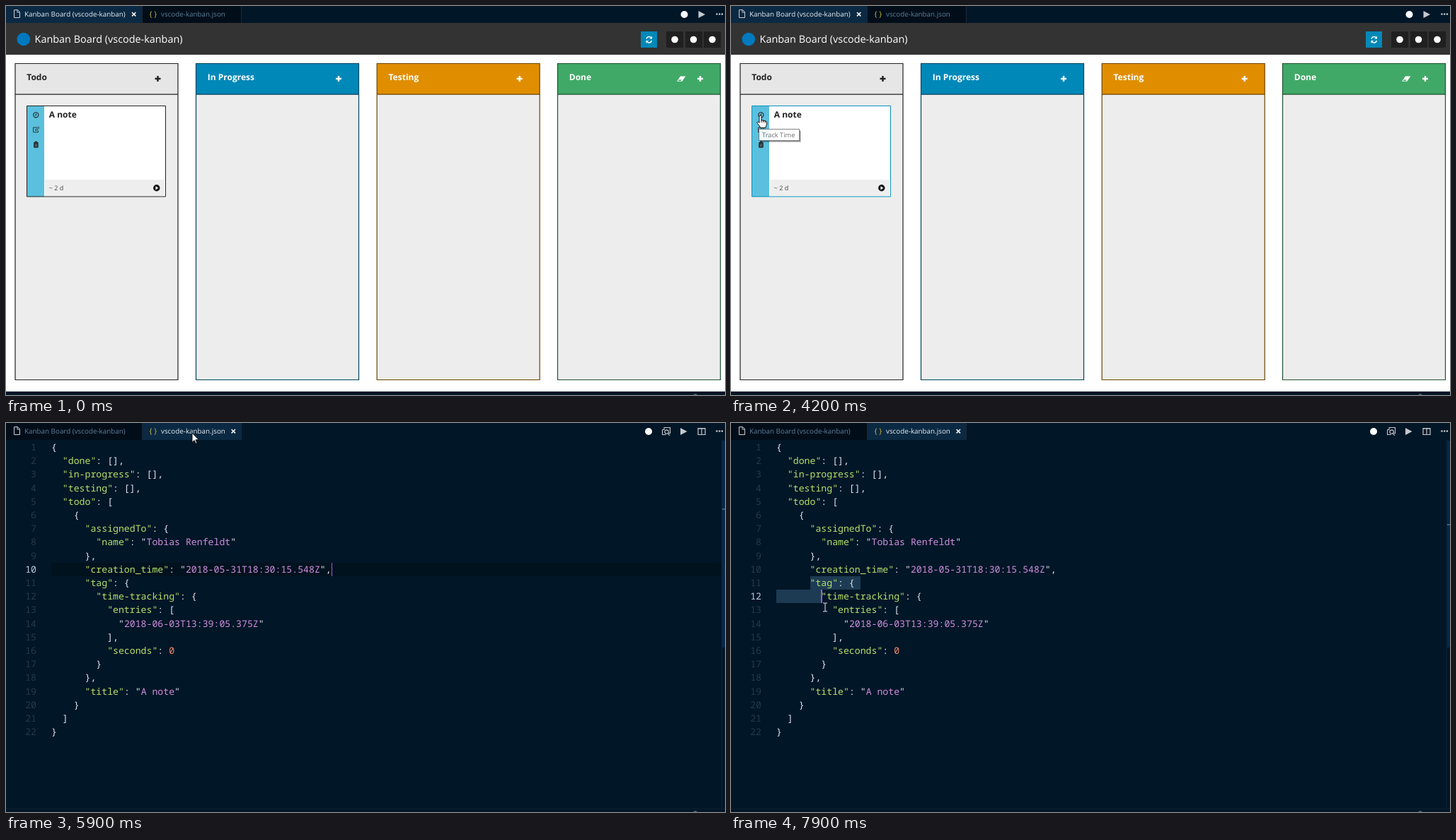
Recreate the animation shown at these times as an HTML page. Size 1016 px wide and 551 px high, loop 8000 ms.

```html
<!DOCTYPE html>
<html lang="en">
<head>
<meta charset="utf-8">
<title>Kanban Board</title>
<style>
html, body { margin: 0; height: 100%; overflow: hidden; background: #011627; }
svg { display: block; width: 100vw; height: 100vh; }
rect { shape-rendering: crispEdges; }
text { font-family: "Open Sans", sans-serif; text-rendering: geometricPrecision; white-space: pre; }
.tab { font-size: 9.84px; }
.head { font-size: 12px; font-weight: 700; }
.code text { font: 500 13.2px "Noto Sans Mono", monospace; fill: #e0e7f1; }
.code .num { fill: #25394a; text-anchor: end; font-weight: 400; }
.code .num.on { fill: #b9cbdb; }
.key { fill: #b4e26b; }
.str { fill: #cf8fdc; }
.val { fill: #f78c6c; }
</style>
</head>
<body>
<svg id="stage" viewBox="0 0 1016 551" preserveAspectRatio="none"></svg>
<script>
const LINE = 19.2, CHAR = 7.92, TOP = 25, LEFT = 64;
const lineTop = n => TOP + LINE * (n - 1);
const colX = c => LEFT + CHAR * c;

const rect = (x, y, w, h, fill, extra = '') =>
  `<rect x="${x}" y="${y}" width="${w}" height="${h}" fill="${fill}" ${extra}/>`;
const path = (d, fill, stroke = 'none', width = 1, extra = '') =>
  `<path d="${d}" fill="${fill}" stroke="${stroke}" stroke-width="${width}" ${extra}/>`;
const dot = (x, y, r, fill) => `<circle cx="${x}" cy="${y}" r="${r}" fill="${fill}"/>`;
const text = (x, y, cls, fill, str, extra = '') =>
  `<text x="${x}" y="${y}" class="${cls}" fill="${fill}" ${extra}>${str}</text>`;
const plus = (x, y, fill) => path(`M${x - 4} ${y}h8M${x} ${y - 4}v8`, 'none', fill, 2.4);
const cross = (x, id = '') => path(`M${x - 2.7} 9l5.4 5.4m0-5.4l-5.4 5.4`, 'none', '#fff', 1.5, id);

function tabs(active) {
  const bg = i => i === active ? '#0b2942' : '#010e1a';
  const fg = i => i === active ? '#e4edf4' : '#5f7e97';
  return rect(0, 0, 1016, 24, '#011627') +
    rect(0, 0, 192, 24, bg(0)) + rect(193, 0, 139, 24, bg(1)) +
    rect(192, 0, 1, 24, '#1c2638') + rect(332, 0, 1, 24, '#1c2638') +
    path('M11.5 5.5h5l3 3v8h-8zM16 5.5v3.5h3.5', 'none', '#c5cdd4') +
    text(26, 15.3, 'tab', fg(0), 'Kanban Board (vscode-kanban)') +
    text(202.5, 15, 'tab', '#cbb841', '{ }', 'style="font-size:10.5px"') +
    text(219, 15.3, 'tab', fg(1), 'vscode-kanban.json') +
    (active ? cross(321.3) : cross(180.7) + cross(321.3, 'id="hoverClose"')) +
    [1004.5, 1008.3, 1012].map(x => dot(x, 11.5, 1.2, '#d0d4d8')).join('');
}

function column(x, title, head, ink, edge) {
  return rect(x + .5, 82, 230, 447, '#ededed') + rect(x + .5, 82, 230, 43, head) +
    path(`M${x + .5} 81.5h230v448h-230zM${x} 125.2h231`, 'none', edge, 1.2) +
    text(x + 16.8, 105.4, 'head', ink, title) + plus(x + 202, 103, ink);
}

const card = rect(30, 142, 195, 128, '#fff') + rect(30, 142, 24, 128, '#5bc0de') +
  rect(55, 246, 169, 23, '#eee') +
  '<path id="cardEdge" d="M29.5 141.5h196v128.5h-196z" fill="none"/>' +
  text(60.8, 157.6, 'head', '#222', 'A note') +
  text(60.8, 261, '', '#444', '~ 2 d', 'font-size="9"') +
  dot(212.8, 257.8, 4.7, '#111') + path('M211.4 255.2l4 2.6-4 2.6z', '#eee') +
  '<circle cx="42.3" cy="154.3" r="3.6" fill="none" stroke="#222" stroke-width="1.1"/>' +
  path('M42.6 152.3v2.4h-1.8', 'none', '#222') +
  path('M43.5 172h-4.9v6.8h6.8v-2.6M41.6 176.4l.3-1.7 3.7-3.6 1.4 1.4-3.7 3.6z', 'none', '#222', .9) +
  path('M39 193.7h6.8M41 193.3v-1.2h2.8v1.2M39.6 194.6h5.6v5.6h-5.6z', '#333', '#222', .9) +
  path('M41.4 195.6v3.6m2 0v-3.6', 'none', '#5bc0de', .6);

const board = tabs(0) + dot(958.5, 12, 5, '#fff') + path('M978.5 7l9.5 5-9.5 5z', '#c5c9cd') +
  rect(0, 24, 1016, 45, '#333') + rect(0, 69, 1016, 477, '#fff') +
  dot(24.8, 47, 9.3, '#0079bf') +
  text(40.6, 52, '', '#fff', 'Kanban Board (vscode-kanban)', 'font-size="14.4"') +
  rect(897, 36, 23, 23, '#0088b8') +
  path('M905 46.5a3.8 3.8 0 0 1 6.8-1.4M912.4 49a3.8 3.8 0 0 1-6.8 1.4', 'none', '#fff', 1.5) +
  path('M913 42.8v3.8h-3.8zM904.4 52.7v-3.8h3.8z', '#fff') +
  [933, 959.5, 986].map(x => rect(x, 36, 24, 23, '#202020') + dot(x + 12, 47.5, 4.8, '#fff')).join('') +
  column(12.5, 'Todo', '#e6e6e6', '#222', '#222') +
  column(268, 'In Progress', '#0088b8', '#fff', '#00435b') +
  column(523.7, 'Testing', '#e08e00', '#fff', '#6b4400') +
  column(779, 'Done', '#41a967', '#fff', '#1d5230') +
  path('M948 106.8l5-7.3h7.3l-5 7.3z', '#fff') +
  path('M950.6 104.5h4.2l-1.1 1.6h-4.2z', '#41a967') + card +
  '<g id="tip">' + rect(42, 177, 57, 16, '#000', 'opacity=".25"') + rect(41, 176, 57, 16, '#000', 'opacity=".3"') +
  rect(39, 174, 58, 17, '#767676') + rect(40, 175, 56, 15, '#fff') +
  text(44, 185.8, '', '#626262', 'Track Time', 'font-size="9.27"') + '</g>';

const source = JSON.stringify({
  done: [], 'in-progress': [], testing: [],
  todo: [{
    assignedTo: { name: 'Tobias Renfeldt' },
    creation_time: '2018-05-31T18:30:15.548Z',
    tag: { 'time-tracking': { entries: ['2018-06-03T13:39:05.375Z'], seconds: 0 } },
    title: 'A note'
  }]
}, null, 2).split('\n');

const paint = line => line.replace(/("[^"]*")(?=:)|"([^"]*)"|(\d+)/g, (_, key, str, num) =>
  key ? `<tspan class="key">${key}</tspan>` :
  num ? `<tspan class="val">${num}</tspan>` : `"<tspan class="str">${str}</tspan>"`);

const editor = tabs(1) + rect(0, 24, 1016, 522, '#011627') +
  dot(908, 12, 5, '#fff') + path('M953 7l9.5 5-9.5 5z', '#c5c9cd') +
  path('M930 10v-3.5h8.5v8h-2M927.5 9.5h3M927.5 9.5v7h5M935.5 15.5l2.5 2', 'none', '#c5c9cd', 1.1) +
  '<circle cx="933.6" cy="12.6" r="2.7" fill="none" stroke="#c5c9cd" stroke-width="1.1"/>' +
  path('M978 7.5h10v9h-10zM983 7v9.5M978 8h10', 'none', '#c5c9cd', 1.2) +
  rect(1011, 24, 1, 522, '#0a2338') + rect(1012, 25, 4, 293, '#06294a') +
  '<g id="mark">' + rect(1012, 0, 4, 2, '#41617a') + '</g>' +
  `<g id="band">${rect(LEFT, 0, 947, 19, '#01121f')}</g><g id="selection"></g><g class="code">` +
  source.map((line, i) => {
    const y = (lineTop(i + 1) + 14).toFixed(1);
    return text(43, y, 'num', '', i + 1) + text(LEFT, y, '', '', paint(line));
  }).join('') + '</g><g id="caret">' + rect(0, 0, 1.4, 19, '#9a5fd0') + '</g>';

const stage = document.getElementById('stage');
stage.innerHTML = `<g id="board">${board}</g><g id="editor">${editor}</g>` +
  rect(0, 546, 1016, 5, '#011627') + rect(0, 546, 1016, 1, '#0d1f2f') +
  path('M971.5 551a3 2 0 0 1 5 0', 'none', '#8395a3') +
  '<g id="pointer">' +
  path('M0 0V13.5L3.2 10.6 5.2 15.2 7 14.4 5 9.8H9.3Z', '#fff', '#000', .9, 'id="arrow"') +
  path('M-2 1.5Q-2 0-.5 0T1 1.5V6.5L7 8Q8.5 8.5 8.5 10V13Q7 15 7 17.5H-.5Q-1 15-4.5 11.5Q-6 9.5-4.5 8.8Q-3 8.6-2 10.5ZM1 6v4m2.6-3v3m2.6-2.4v3',
    '#fff', '#000', .9, 'id="hand"') +
  path('M-3-6H-1Q0-6 0-5V5Q0 6-1 6H-3M3-6H1Q0-6 0-5M0 5Q0 6 1 6H3', 'none', '#e8e8e8', 1, 'id="beam"') + '</g>';

const el = id => document.getElementById(id);
const show = (id, on) => el(id).style.display = on ? '' : 'none';
const place = (id, x, y) => el(id).setAttribute('transform', `translate(${x} ${y})`);
const clamp = v => Math.max(0, Math.min(1, v));
const numbers = stage.querySelectorAll('.num');

// time, x, y
const route = [
  [1500, 396, 245], [2200, 39, 155], [2400, 39, 155], [2500, 42, 155], [4900, 42, 155],
  [5600, 263, 14], [6600, 263, 14], [7400, 112, 215], [7500, 112, 226], [7600, 112, 226], [7900, 133, 261]
];

function pointerAt(t) {
  const i = Math.max(1, route.findIndex(p => p[0] >= t));
  const [t0, x0, y0] = route[i - 1], [t1, x1, y1] = route[i];
  const u = clamp((t - t0) / (t1 - t0)), k = u * u * (3 - 2 * u);
  return [x0 + (x1 - x0) * k, y0 + (y1 - y0) * k];
}

function selectionFor(t) {
  if (t < 7700) return '';
  const x = colX(6), sel = '#1d3b53';
  if (t < 7900) return rect(x, lineTop(11), CHAR * (t < 7800 ? 1 : 3), LINE, sel);
  return rect(x, lineTop(11), CHAR * 9, LINE, sel) + rect(LEFT, lineTop(12), CHAR * 8, LINE, sel);
}

function render(now) {
  const t = Math.floor(now % 8000 / 100) * 100;
  const coding = t >= 5900;
  const [x, y] = pointerAt(t);
  show('board', !coding);
  show('editor', coding);

  show('pointer', t >= 1500);
  place('pointer', x.toFixed(1), y.toFixed(1));
  const hand = !coding && (x < 50 && y < 162 || y < 24);
  const beam = coding && y >= 26;
  show('hand', hand);
  show('beam', beam);
  show('arrow', !hand && !beam);

  const hover = t >= 1500 && t < 5900 && y > 141;
  el('cardEdge').setAttribute('stroke', hover ? '#0b8fbd' : '#222');
  show('hoverClose', t >= 5000 && y < 24);
  el('tip').style.opacity = Math.min(clamp((t - 2400) / 400), clamp((4500 - t) / 330));

  const row = t < 7600 ? 10 : t < 7900 ? 11 : 12;
  const col = t < 7600 ? 50 : t < 7700 ? 6 : t < 7800 ? 7 : t < 7900 ? 9 : 8;
  numbers.forEach((n, i) => n.classList.toggle('on', i + 1 === row));
  place('band', 0, lineTop(row));
  show('band', t < 7700);
  place('mark', 0, 121 + 11 * (row - 10));
  place('caret', colX(col), lineTop(row));
  show('caret', t >= 7600 || Math.floor((t - 5900) / 500) % 2 === 0);
  el('selection').innerHTML = selectionFor(t);
}

function loop() {
  render(performance.now());
  requestAnimationFrame(loop);
}
loop();
</script>
</body>
</html>
```
